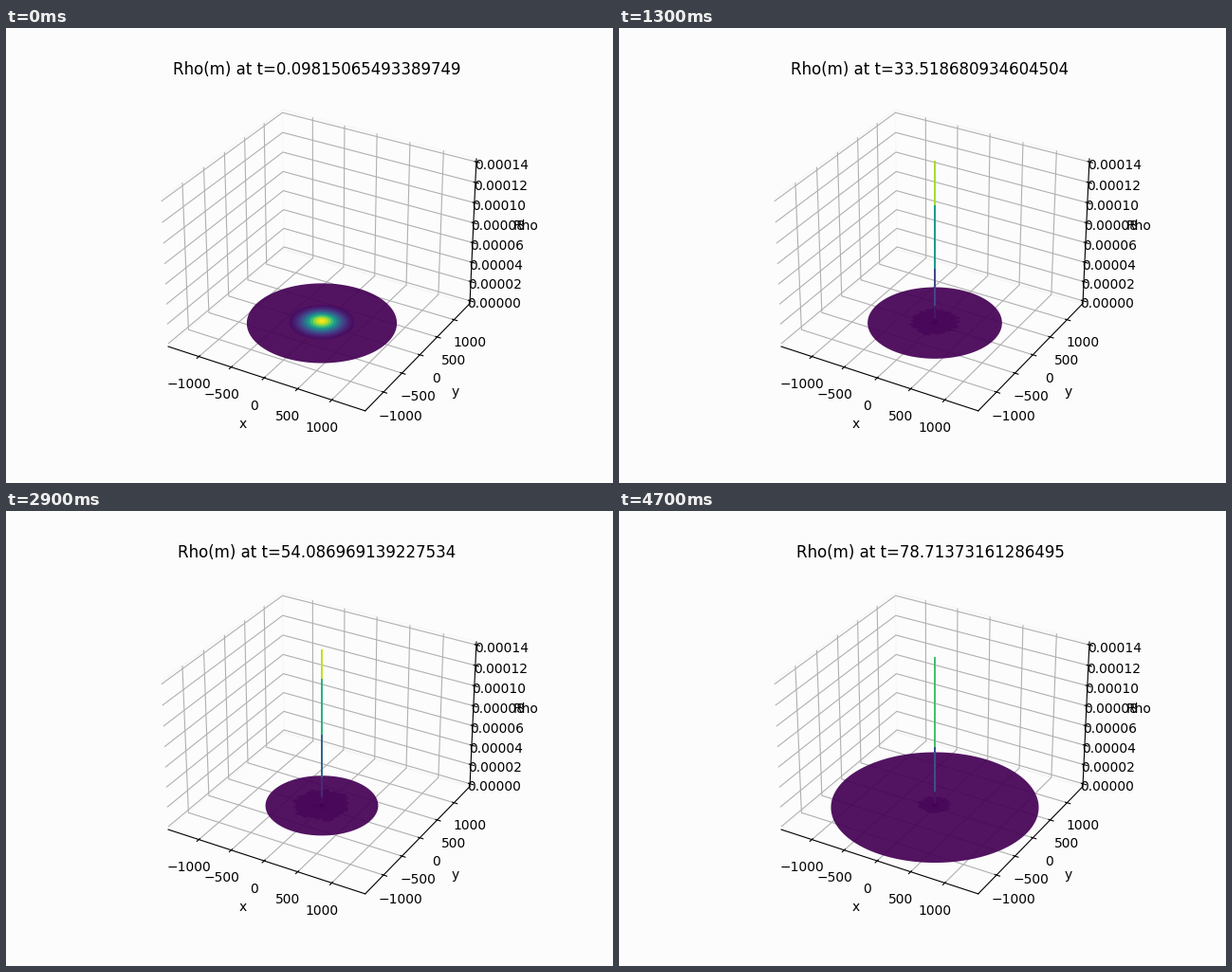
These frames come from a looping animation (640x480 px, 4800 ms). A matplotlib script:

```python
import numpy as np
import matplotlib.pyplot as plt
from matplotlib.animation import FuncAnimation
from mpl_toolkits.mplot3d.art3d import Poly3DCollection

FRAMES, INTERVAL = 48, 100
BACK = "#fcfcfc"
VIRIDIS = plt.get_cmap("viridis")
PURPLE = VIRIDIS(0)[:3]
PAD = 25 / 24          # small margin around the data box
HALF = 1422 * PAD
Z_TOP = 1.4e-4
RINGS = 12
SPIKE_WIDTH = 1.44     # two pixels

# Simulation time at a few key steps.
STEPS = [0, 8, 17, 24, 34, 41, 47]
TIMES = [0.09815065493389749, 27.382121958895592, 38.42792811517164,
         47.39722216506857, 60.776716113386506, 70.39047346653602,
         78.71373161286495]


def sim_time(n):
    """Big steps during the collapse, nearly even ones afterwards."""
    if n < STEPS[1]:
        u = n / STEPS[1]
        n = STEPS[1] * (0.35 * u + 0.65 * (1 - (1 - u) ** 4))
    return float(np.interp(n, STEPS, TIMES))


def disc_radius(t):
    """Free fall, then a rebound."""
    return 1006 - 0.0934 * t**2 + 15.4 * max(t - 52.72, 0) ** 1.27


def density(t):
    """Ring radii and densities; the wide glow collapses into a thin spike."""
    size = disc_radius(t) / 1000
    grow = 1 - np.exp(-(t / 12) ** 4)
    peak = 1e-6 + grow * (1.679 - 0.0028 * t) * 1e-4
    drop = 0.03 + grow * (0.4 * size**2.5 - 0.03)
    power = 2 + grow * (0.6 - 0.87 * size)
    k = np.arange(RINGS)
    return k * 40 * np.sqrt(1e-6 / peak), peak * np.exp(-drop * k**power)


fig = plt.figure(figsize=(6.4, 4.8), dpi=100, facecolor=BACK)
ax = fig.add_subplot(projection="3d", computed_zorder=False, facecolor=BACK)
ax.set_xlim(-HALF, HALF)
ax.set_ylim(-HALF, HALF)
margin = Z_TOP * (PAD - 1) / 2
ax.set_zlim(-margin, Z_TOP + margin)
z_ticks = np.arange(8) * 2e-5
ax.set_zticks(z_ticks, [f"{z:.5f}" for z in z_ticks])
ax.set(xlabel="x", ylabel="y", zlabel="Rho")
for axis in (ax.xaxis, ax.yaxis, ax.zaxis):
    axis.pane.set_facecolor(BACK)
    axis.pane.set_edgecolor("#f3f3f3")

artists = []


def add_flat(radius, color, zorder, z=0, count=64):
    """Filled level outline; radius may vary with the angle."""
    a = np.linspace(0, 2 * np.pi, count, endpoint=False)
    pts = np.column_stack([radius * np.cos(a), radius * np.sin(a), np.full(count, z)])
    poly = Poly3DCollection([pts], facecolors=[color], linewidths=0, zorder=zorder)
    ax.add_collection3d(poly)
    artists.append(poly)


def add_peak(t):
    r, rho = density(t)
    for k in range(RINGS - 1, 0, -1):
        color = VIRIDIS((rho[k - 1] + rho[k]) / 2 / rho[0])
        add_flat(r[k], color, 3, rho[k], 24)
        artists.extend(ax.plot([0, 0], [0, 0], rho[k - 1:k + 1], color=color,
                               lw=SPIKE_WIDTH, solid_capstyle="butt", zorder=3))


def update(n):
    while artists:
        artists.pop().remove()
    t = sim_time(n)
    radius = disc_radius(t)
    ragged = np.random.default_rng(n).uniform(0.84, 1.08, 64)
    add_flat(radius, (*PURPLE, 0.925), 1, count=180)
    add_flat(297000 / radius * ragged, (*PURPLE, 0.6), 2)
    add_peak(t)
    ax.set_title(f"Rho(m) at t={t}")
    return artists


anim = FuncAnimation(fig, update, frames=FRAMES, interval=INTERVAL,
                     init_func=lambda: artists, repeat=True, repeat_delay=0)
plt.show()
```
